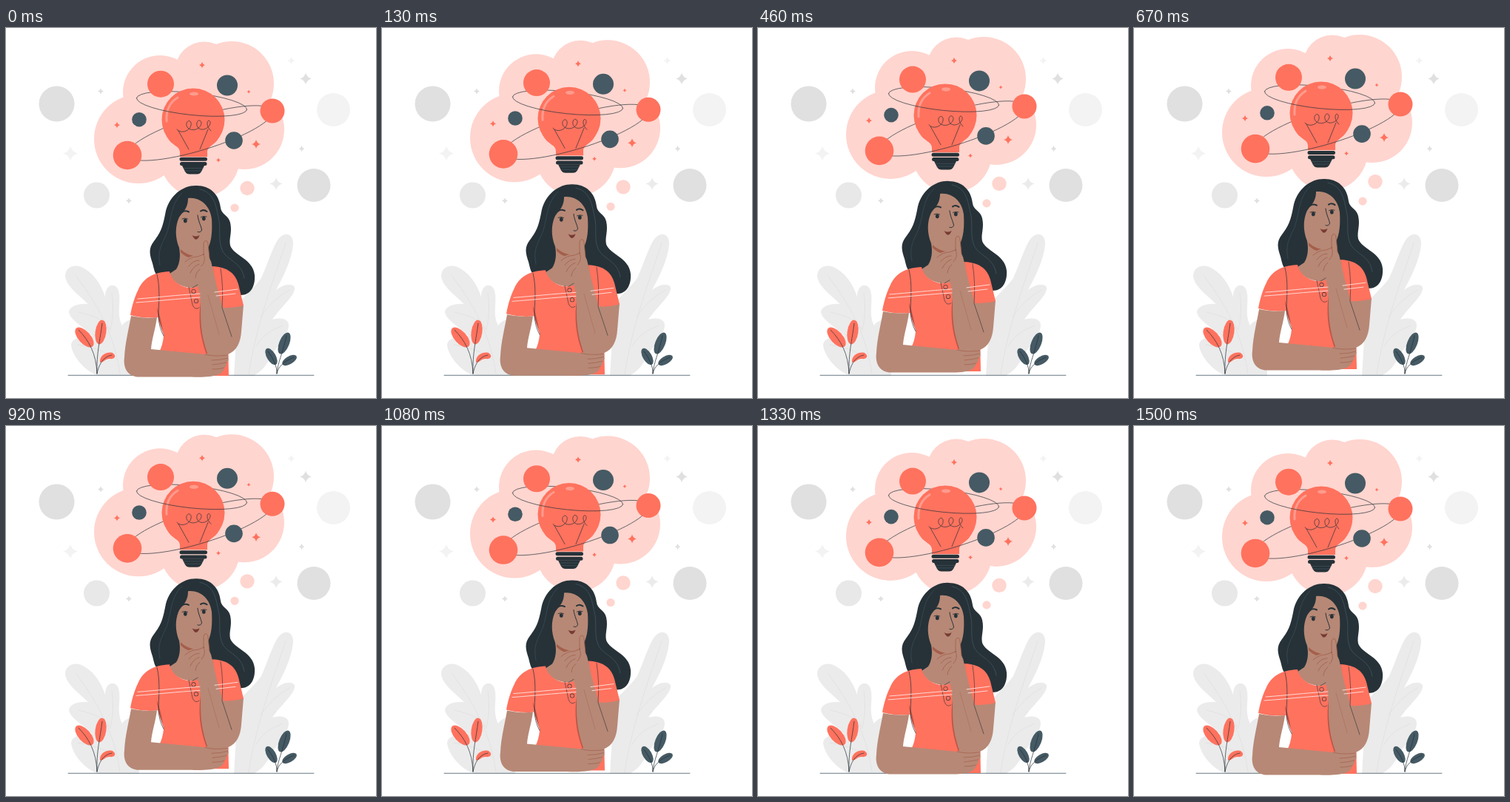
An HTML page with a canvas for the animation above (1.54 s loop, 500 by 500 pixels).

```html
<!DOCTYPE html>
<html lang="en">
<head>
<meta charset="utf-8">
<title>Thinking about ideas</title>
<style>
  html, body { margin: 0; width: 100%; height: 100%; overflow: hidden; background: #fff; }
  canvas { display: block; width: 500px; height: 500px; }
</style>
</head>
<body>
<canvas id="stage"></canvas>
<script>
const canvas = document.getElementById('stage');
const ctx = canvas.getContext('2d');
const ratio = window.devicePixelRatio || 1;
canvas.width = canvas.height = Math.round(500 * ratio);

const CORAL = '#ff725e', PINK = '#ffd5cf', INK = '#263238', SLATE = '#455a64';
const SKIN = '#b78876', SHADE = '#a45f4b', PALE = '#ebebeb', GREY = '#e0e0e0', MIST = '#f3f3f3';

const LOOP = 1540, FPS = 24, FLOAT_STEPS = 36, RISE = 10;

function fill(path, color) {
  ctx.fillStyle = color;
  ctx.fill(new Path2D(path));
}

function line(path, color = INK, width = 0.7) {
  ctx.strokeStyle = color;
  ctx.lineWidth = width;
  ctx.lineCap = ctx.lineJoin = 'round';
  ctx.stroke(new Path2D(path));
}

function oval(x, y, rx, ry, color, degrees = 0) {
  ctx.fillStyle = color;
  ctx.beginPath();
  ctx.ellipse(x, y, rx, ry, degrees * Math.PI / 180, 0, Math.PI * 2);
  ctx.fill();
}

const disc = (x, y, r, color) => oval(x, y, r, r, color);

function arc(x, y, rx, ry, degrees, from, to) {
  ctx.strokeStyle = INK;
  ctx.lineWidth = 0.7;
  ctx.beginPath();
  ctx.ellipse(x, y, rx, ry, degrees * Math.PI / 180, from * Math.PI, to * Math.PI);
  ctx.stroke();
}

function sparkle(x, y, r, color) {
  const k = r * 0.2;
  ctx.fillStyle = color;
  ctx.beginPath();
  ctx.moveTo(x, y - r);
  ctx.quadraticCurveTo(x + k, y - k, x + r, y);
  ctx.quadraticCurveTo(x + k, y + k, x, y + r);
  ctx.quadraticCurveTo(x - k, y + k, x - r, y);
  ctx.quadraticCurveTo(x - k, y - k, x, y - r);
  ctx.fill();
}

function drawBackdrop() {
  disc(68.5, 102.5, 24, GREY);
  disc(442.5, 110.5, 22.5, MIST);
  disc(122.5, 226, 17.5, '#e8e8e8');
  disc(416, 212.5, 22.5, GREY);

  sparkle(405, 68.5, 8, GREY);
  sparkle(385.5, 44, 5, MIST);
  sparkle(128, 85.5, 4, GREY);
  sparkle(87, 169.5, 10, MIST);
  sparkle(399.5, 163, 4, GREY);
  sparkle(365, 210.5, 8.5, PALE);
  sparkle(166, 233.5, 4, GREY);

  // Large pale leaves
  fill('M80 334C81 323 92 319 102 323C117 330 127 343 134 363C134 353 139 346 146 348C154 351 154 363 153 376' +
       'C152 388 154 397 157 402C160 397 168 392 178 394L180 470H126C107 465 89 443 88 428C89 419 101 416 117 417' +
       'C103 402 87 395 85 384C86 375 99 372 111 373C96 359 80 347 80 334Z', PALE);
  fill('M308 470L314 372C328 357 340 345 345 338C354 318 361 294 369 284C377 275 388 278 388 291C387 313 373 339 365 354' +
       'C374 347 385 344 390 350C392 361 371 377 360 394C370 391 382 392 382 402C381 418 364 432 357 445' +
       'C351 459 341 467 334 470Z', PALE);
  const vein = '#dfdfdf';
  line('M94 334C117 365 145 405 154 467M98 384C118 389 132 393 141 408M143 358Q147 383 141 408' +
       'M97 428Q130 433 148 447', vein);
  line('M378 290C364 334 338 400 328 468M383 354Q362 365 344 390M374 402Q347 412 338 430', vein);

  line('M84 469.3H416', SLATE, 0.8);

  // Small coral sprig
  oval(106, 418, 16.5, 8.2, CORAL, 48);
  oval(128, 411, 16.5, 7.4, CORAL, 98);
  fill('M127 452C126 443 135 437 144 439C150 443 147 448 140 447C134 447 132 452 127 452Z', CORAL);
  line('M98 408C112 422 122 440 123 467M130 399C127 423 122 440 123 467M143 442C130 444 125 457 123 467');

  // Small dark sprig
  oval(376, 426, 15.5, 6.8, SLATE, -68);
  oval(358.5, 444, 12.5, 6, SLATE, 60);
  oval(383, 449, 11, 5.3, SLATE, -30);
  line('M379 416C374 440 367 452 366 467M354 437Q367 454 366 467M389 445C374 451 368 458 366 467');
}

function drawCloud() {
  const puffs = [[305, 75, 57], [268, 58, 39.5], [208, 87, 50], [179, 150, 60],
                 [262, 175, 54], [322, 137, 54], [255, 115, 55]];
  for (const [x, y, r] of puffs) disc(x, y, r, PINK);
  disc(326, 216.5, 9.7, PINK);
  disc(309, 243, 5.6, PINK);

  sparkle(265, 50, 4, CORAL);
  sparkle(150, 131, 4, CORAL);
  sparkle(338, 157, 6, CORAL);
  sparkle(287, 178.5, 3, CORAL);
  sparkle(328, 86, 2.5, CORAL);
}

function drawBulb() {
  // Rear halves of both orbits pass behind the glass
  arc(251, 102.5, 75, 15, 6, 1, 2);
  arc(262, 142, 103, 23, -17, 1, 2);

  disc(253, 124, 42.5, CORAL);
  fill('M219 149C223 158 235 159 235 168V174H272V168C272 159 283 158 287 149Z', CORAL);
  oval(254, 89, 6, 2.6, '#ff9b8d');
  line('M217 126C216 111 222 100 232 94', '#ff9b8d', 3);

  line('M247 164L233 139M262 164L273 137' +
       'M231 137C238 145 252 137 250 128C248 122 241 128 245 134C250 141 264 137 264 128' +
       'C262 121 255 127 259 134C264 141 277 135 276 127C273 121 268 131 277 139');

  fill('M238 186H268L264 194Q262 197.5 258 197.5H248Q244 197.5 242 194Z', INK);
  line('M237 177.3H269.5M237.5 183.6H269', INK, 5);
  line('M240 189.5H266M242 193H264', SLATE, 0.6);

  arc(251, 102.5, 75, 15, 6, 0, 1);
  arc(262, 142, 103, 23, -17, 0, 1);

  disc(209, 75.7, 18, CORAL);
  disc(299, 77.5, 14, SLATE);
  disc(360, 112, 16.5, CORAL);
  disc(164, 172, 19.3, CORAL);
  disc(180, 123.7, 9.8, SLATE);
  disc(308, 152, 11.8, SLATE);
}

function drawHead() {
  fill('M258 213C240 212 222 225 216 247C212 268 210 275 200 288C192 298 194 306 198 318C200 326 201 331 204 334' +
       'L300 345L317 361C330 361 337 350 336 334C334 312 308 308 303 294C301 284 306 276 303 263' +
       'C301 253 291 252 290 243C288 224 275 213 258 213Z', INK);
  line('M262 218C282 222 284 242 287 256C291 270 286 285 292 300C299 315 318 315 322 338', SLATE);
  line('M238 223C222 238 224 258 217 278C210 294 204 301 208 321', SLATE, 0.5);

  fill('M246 230C262 228 276 240 278 258C279 275 278 288 272 300Q269 305 264 308L265 330L262 350' +
       'C245 354 226 347 221 332L230 326C235 318 236 308 234 297C228 282 229 268 233 258' +
       'C237 249 246 246 246 230Z', SKIN);
  fill('M236 299C243 306 255 310 264 308L264 311C252 314 242 309 236 303Z', SHADE);

  oval(242.3, 260.5, 2.4, 2.8, INK);
  oval(267.3, 257.6, 2.4, 2.8, INK);
  line('M238 249Q242 246 247 248.5M263 247.5Q267 244.5 271.5 248', INK, 2);
  line('M238 258Q242 256 245.5 258M263.5 255.5Q267 253.5 271 255', INK, 0.9);
  line('M259 253C260 262 264 268 264.5 273Q263 277 259 275.5', INK, 1);
  fill('M251.5 280Q256 283 261.5 280Q259.5 286.5 255.5 285.5Q253.5 284 251.5 280Z', '#773a32');
}

function drawTorso() {
  fill('M221 329C199 330 186 338 179 353C173 365 170 377 168 388Q187 393 205 391L204 381C206 401 212 407 213 416' +
       'Q212 428 207 438L218 470H301L300 425L293 360L279 322L265 326C268 337 265 345 258 350' +
       'C243 354 225 346 221 329Z', CORAL);
  fill('M204 377C205 394 210 403 212 412C211 399 207 386 204 377Z', '#b75042');
  line('M204 333C209 352 206 375 206 391Q207 405 213 416', INK, 0.7);

  line('M247 350L252 374Q255 382 261 378M252 351L262 345', INK, 0.6);
  for (const [x, y] of [[253.5, 356], [257, 369]]) {
    disc(x, y, 3, INK);
    disc(x, y, 2.4, CORAL);
  }
}

function drawArms() {
  fill('M263 370C259 400 264 422 271 441H276L268 390Z', '#bd5445');
  fill('M258 333C259 352 264 365 263 385C263 410 267 425 273 442L300 441C312 436 317 425 318 410' +
       'L321 374L293 378C288 360 282 340 279 322Z', SKIN);
  fill('M279 322C300 323 310 332 314 346L321 375Q307 379 293 378Q288 350 279 322Z', CORAL);
  line('M290 325Q294 350 292 378L305 417', INK, 0.6);
  line('M273 361L288 414', SHADE, 0.4);

  const stripe = '#ffd9d3';
  line('M178 366C205 364 230 361 262 359M282 357L313 353', stripe, 1);
  line('M176 371C205 369 230 366 262 364M284 362L310 359', stripe, 1);

  // Hand at the chin
  fill('M267 292C267 286 273 286 273 292L275 311Q280 320 278 331C276 341 271 347 264 345Q258 343 256 337' +
       'C250 340 247 335 249 331C244 332 243 327 247 322C240 323 238 318 243 313C248 307 256 308 268 306Z', SKIN);
  line('M267 305L267 292C267 286 273 286 273 292L275 311M242 316Q250 309 259 309L267 306' +
       'M247 322Q253 314 261 314M249 331Q253 322 261 319M256 337Q257 329 262 326M267 306Q271 315 264 322', SHADE, 0.8);

  // Folded arm resting below
  fill('M169 389Q187 393 204 391C202 407 197 420 196 434L269 441C278 436 289 440 297 440Q302 442 300 446' +
       'Q302 449 298 452Q299 457 295 459Q294 465 288 468C278 472 263 472 250 471.5H181' +
       'C165 472 158 460 160 445C161 425 166 407 169 389Z', SKIN);
  line('M269 441C280 444 290 443 300 442M278 449Q290 449 300 446M279 455Q290 454 298 452M279 461Q289 461 295 459', SHADE, 0.7);
}

function floatOffset(time) {
  const step = Math.floor((time % LOOP + 4.9) * FPS / 1000);
  const phase = (step + 1) % FLOAT_STEPS / FLOAT_STEPS;
  return RISE * (1 - Math.abs(1 - 2 * phase));
}

function render(time) {
  ctx.setTransform(ratio, 0, 0, ratio, 0, 0);
  ctx.fillStyle = '#fff';
  ctx.fillRect(0, 0, 500, 500);
  drawBackdrop();
  ctx.translate(0, 0.55 - floatOffset(time));
  drawCloud();
  drawBulb();
  drawHead();
  drawTorso();
  drawArms();
}

let start;
function tick(now) {
  start ??= now;
  render(now - start);
  requestAnimationFrame(tick);
}
render(0);
requestAnimationFrame(tick);
</script>
</body>
</html>
```
